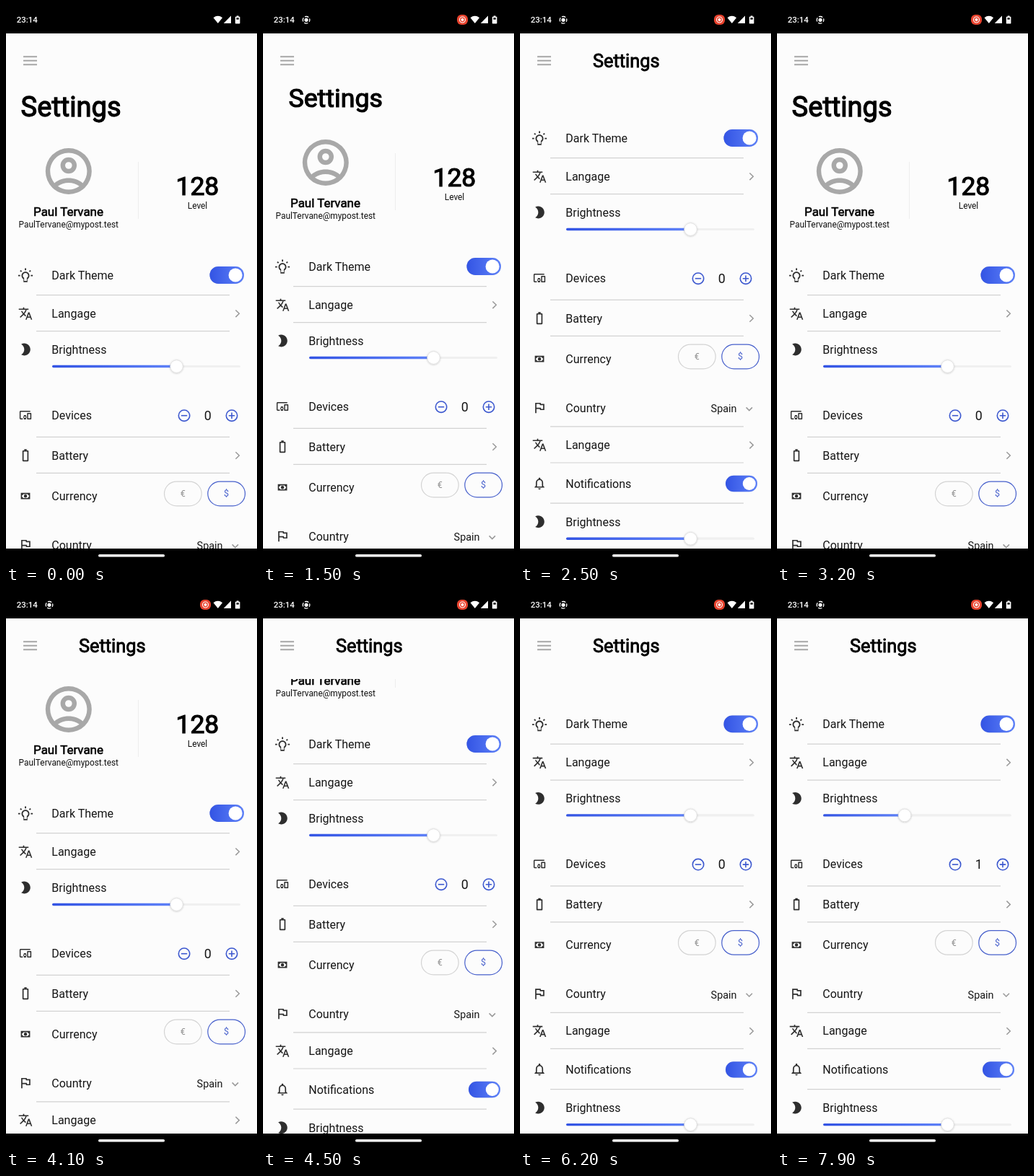
Animation, 348 px wide and 772 px high, one loop 8 s. Source, as an HTML page:

```html
<!DOCTYPE html>
<html lang="en">
<head>
<meta charset="utf-8">
<title>Settings</title>
<style>
  html, body { margin: 0; width: 100%; height: 100%; overflow: hidden; background: #fcfcfc; }
  svg { display: block; width: 348px; height: 772px; font-family: Roboto, sans-serif; }
  .label { font-size: 16px; fill: #161616; }
  .small { font-size: 11.85px; fill: #111; }
  .heavy { fill: #000; stroke: #000; stroke-width: .034em; }
  .mid { text-anchor: middle; }
  .rule { stroke: #d2d2d2; stroke-width: 1.2; }
  .icon { fill: #2e2e2e; fill-rule: evenodd; }
  .line { fill: none; stroke: #999; stroke-width: 1.5; }
  .blue { fill: none; stroke: #3c58cf; stroke-width: 1.6; }
</style>
</head>
<body>
<svg viewBox="0 0 348 772">
  <defs>
    <linearGradient id="accent"><stop stop-color="#3354e4"/><stop offset="1" stop-color="#5f82f8"/></linearGradient>
    <filter id="shadow" x="-30%" y="-30%" width="160%" height="160%">
      <feDropShadow dx="0" dy=".5" stdDeviation=".8" flood-opacity=".25"/>
    </filter>
  </defs>
  <rect width="348" height="772" fill="#fcfcfc"/>
  <g id="page"></g>
  <rect id="header" y="38" width="348" fill="#fcfcfc"/>
  <path d="M24 70.2h19M24 75.7h19M24 81.2h19" stroke="#a6a6a6" stroke-width="2"/>
  <text id="title" class="heavy" font-size="25.4">Settings</text>

  <rect width="348" height="38"/>
  <text x="14.7" y="23.2" font-size="11.4" font-weight="500" fill="#fff">23:14</text>
  <g id="cast" fill="none" stroke="#fff" stroke-width="1.3">
    <circle cx="60" cy="19.3" r="4.8" stroke-dasharray="5.5 2.04" stroke-dashoffset="2.7"/>
    <circle cx="60" cy="19.3" r="2.6" fill="#fff" stroke="none"/>
  </g>
  <g id="badge">
    <rect x="269" y="12" width="15" height="14" rx="6" fill="#e8432e"/>
    <circle cx="276.5" cy="19" r="4" fill="none" stroke="#fff" stroke-width="1.1"/>
    <circle cx="276.5" cy="19" r="2" fill="#fff"/>
  </g>
  <g fill="#fff">
    <path d="M287.5 16.2Q293.8 11.4 300.1 16.2L293.8 24z"/>
    <path d="M312 13.6V24H301.8z"/>
    <path d="M319.7 13.4h2.8v1.3h1.1q.8 0 .8 .8v8.2q0 .8-.8 .8h-5q-.8 0-.8-.8v-8.2q0-.8.8-.8h1.1z"/>
    <path d="M319.4 16.3h3.4v2.4h-3.4z" fill="#000"/>
  </g>
  <rect y="752" width="348" height="20"/>
  <rect x="128" y="760" width="92" height="3.6" rx="1.8" fill="#fff"/>
</svg>
<script>
const LOOP = 8000, STEP = 100;
const $ = id => document.getElementById(id);

const icons = {
  bulb: "M3.55 18.54l1.41 1.41 1.8-1.79-1.41-1.41zM11 22.45h2V19.5h-2zM4 10.5H1v2h3zM15 6.31V1.5H9v4.81C7.21 7.35 6 9.28 6 11.5c0 3.31 2.69 6 6 6s6-2.69 6-6c0-2.22-1.21-4.15-3-5.19zM12 15.5c-2.21 0-4-1.79-4-4 0-1.48.81-2.77 2-3.46V3.5h4v4.54c1.19.69 2 1.98 2 3.46 0 2.21-1.79 4-4 4zM20 10.5v2h3v-2zM17.24 18.16l1.79 1.8 1.41-1.41-1.8-1.79z",
  translate: "M12.87 15.07l-2.54-2.51.03-.03c1.74-1.94 2.98-4.17 3.71-6.53H17V4h-7V2H8v2H1v1.99h11.17C11.5 7.92 10.44 9.75 9 11.35 8.07 10.32 7.3 9.19 6.69 8h-2c.73 1.63 1.73 3.17 2.98 4.56l-5.09 5.02L4 19l5-5 3.11 3.11zM18.5 10h-2L12 22h2l1.12-3h4.75L21 22h2zm-2.62 7l1.62-4.33L19.12 17z",
  moon: "M10 2c-1.82 0-3.53.5-5 1.35C7.99 5.08 10 8.3 10 12s-2.01 6.92-5 8.65C6.47 21.5 8.18 22 10 22c5.52 0 10-4.48 10-10S15.52 2 10 2z",
  devices: "M3 6h18V4H3c-1.1 0-2 .9-2 2v12c0 1.1.9 2 2 2h4v-2H3zM13 12H9v1.78c-1.33 1.2-1.33 3.24 0 4.44V20h4v-1.78c1.33-1.2 1.33-3.24 0-4.44zM11 17.5a1.5 1.5 0 1 1 0-3 1.5 1.5 0 0 1 0 3zM22 8h-6c-.5 0-1 .5-1 1v10c0 .5.5 1 1 1h6c.5 0 1-.5 1-1V9c0-.5-.5-1-1-1zm-1 10h-4v-8h4z",
  battery: "M15.67 4H14V2h-4v2H8.33C7.6 4 7 4.6 7 5.33v15.33C7 21.4 7.6 22 8.33 22h7.33c.74 0 1.34-.6 1.34-1.33V5.33C17 4.6 16.4 4 15.67 4zM15 20H9V6h6z",
  money: "M4 6.5h16v11H4zM8 8.5a2 2 0 0 1-2 2v3a2 2 0 0 1 2 2h8a2 2 0 0 1 2-2v-3a2 2 0 0 1-2-2zM12 9.2a2.8 2.8 0 1 1 0 5.6 2.8 2.8 0 0 1 0-5.6z",
  flag: "M12.36 6l.4 2H18v6h-3.36l-.4-2H7V6zM14 4H5v17h2v-7h5.6l.4 2h7V6h-5.6z",
  bell: "M12 22c1.1 0 2-.9 2-2h-4c0 1.1.89 2 2 2zM18 16v-5c0-3.07-1.64-5.64-4.5-6.32V4c0-.83-.67-1.5-1.5-1.5s-1.5.67-1.5 1.5v.68C7.63 5.36 6 7.92 6 11v5l-2 2v1h16v-1zM16 17H8v-6c0-2.48 1.51-4.5 4-4.5s4 2.02 4 4.5z",
  person: "M12 2a10 10 0 1 0 0 20 10 10 0 0 0 0-20zM7.35 18.5C8.66 17.56 10.26 17 12 17s3.34.56 4.65 1.5C15.34 19.44 13.74 20 12 20s-3.34-.56-4.65-1.5zM18.14 17.12C16.45 15.8 14.32 15 12 15s-4.45.8-6.14 2.12C4.7 15.73 4 13.95 4 12c0-4.42 3.58-8 8-8s8 3.58 8 8c0 1.95-.7 3.73-1.86 5.12zM12 6a3.5 3.5 0 1 0 0 7 3.5 3.5 0 0 0 0-7zM12 11a1.5 1.5 0 1 1 0-3 1.5 1.5 0 0 1 0 3z"
};

const icon = (name, x, y, sx, sy = sx, attrs = "") =>
  `<path class="icon" ${attrs} transform="translate(${x} ${y}) scale(${sx} ${sy}) translate(-12 -12)" d="${icons[name]}"/>`;
const row = (name, label, y, size = .846, flip = 1) =>
  icon(name, 27, y - .5, size, size * flip) + `<text class="label" x="63.3" y="${y + 5.4}">${label}</text>`;
const rule = y => `<path class="rule" d="M42 ${y}H310"/>`;
const next = y => `<path class="line" d="M318.4 ${y - 4.8}l4.9 4.8l-4.9 4.8"/>`;
const toggle = (id, x, y, w, h) => `
  <rect x="${x}" y="${y - h / 2}" width="${w}" height="${h}" rx="${h / 2}" fill="#dcdcdc"/>
  <rect id="${id}Track" x="${x}" y="${y - h / 2}" width="${w}" height="${h}" rx="${h / 2}" fill="url(#accent)"/>
  <circle id="${id}Knob" cx="${x + w - h / 2}" cy="${y}" r="${h * .4}" fill="#fff"/>`;
const slider = (id, y) => `
  <rect x="64" y="${y - 1.6}" width="261" height="3.2" rx="1.6" fill="#f0f0f0"/>
  <rect id="${id}Fill" x="64" y="${y - 1.7}" width="173" height="3.4" rx="1.7" fill="url(#accent)"/>
  <circle id="${id}Thumb" cx="236.5" cy="${y}" r="8.8" fill="#fff" stroke="#ddd" stroke-width=".8" filter="url(#shadow)"/>`;
const stepButton = (x, y, sign) =>
  `<g class="blue"><circle cx="${x}" cy="${y}" r="7.7"/><path d="M${x - 4.2} ${y}h8.4${sign}"/></g>`;
const pill = (x, text, edge, ink) => `
  <rect x="${x}" y="659.2" width="51.7" height="33.6" rx="16.8" fill="none" stroke="${edge}" stroke-width="1.2"/>
  <text class="mid" x="${x + 25.8}" y="680.3" font-size="12.5" fill="${ink}">${text}</text>`;

$("page").innerHTML = [
  icon("person", 86.8, 229, 3.2, 3.2, 'style="fill:#a8a8a8"'),
  '<text class="heavy mid" x="86.5" y="290.6" font-size="16.93">Paul Tervane</text>',
  '<text class="small mid" x="86.8" y="307.2">PaulTervane@mypost.test</text>',
  '<path d="M183.5 216V295" stroke="#ededed"/>',
  '<text class="heavy mid" x="265.4" y="262.4" font-size="35.5">128</text>',
  '<text class="small mid" x="265.5" y="281.2">Level</text>',
  row("bulb", "Dark Theme", 373.7, .92, -1), toggle("theme", 282.4, 373, 47.6, 23.8), rule(400.7),
  row("translate", "Langage", 426.7), next(426.3), rule(450.7),
  row("moon", "Brightness", 476.5), slider("light", 499.5),
  row("devices", "Devices", 567.5, .74), stepButton(247, 567.7, ""), stepButton(313, 567.7, "m-4.2 -4.2v8.4"),
  '<text id="count" class="mid" x="279.7" y="574" font-size="17.8" fill="#161616">0</text>', rule(597.4),
  row("battery", "Battery", 623.2), next(623), rule(647.4),
  row("money", "Currency", 679.7, .8),
  pill(219.5, "€", "#d4d4d4", "#8c8c8c"), pill(279.8, "$", "#4760cc", "#4760cc"),
  row("flag", "Country", 747.2),
  '<text x="264.6" y="753.2" font-size="14.4" fill="#161616">Spain</text>',
  '<path class="line" d="M313.6 746.4l4.2 4.2l4.2-4.2"/>', rule(772.9),
  row("translate", "Langage", 798.7), next(798.6), rule(823),
  row("bell", "Notifications", 852.2), toggle("notice", 285, 852, 44, 22.4), rule(879.2),
  row("moon", "Brightness", 905.2), slider("glow", 928.2)
].join("");

const scrollSteps = [[1400, 0], [1500, 12], [1600, 50], [1700, 95], [1800, 128], [1900, 151.5],
  [2000, 167], [2200, 183], [2500, 190], [2600, 190], [2700, 178], [2800, 130], [2900, 78],
  [3000, 36], [3100, 10], [3200, 0], [3400, 0], [3500, 3], [3700, 17], [3900, 40], [4100, 65],
  [4300, 119], [4500, 161], [4700, 174.5], [4900, 181], [5100, 185], [5300, 187], [5600, 188.6]];
const thumbSteps = [[6900, 236.5], [7000, 230], [7100, 211], [7200, 194], [7300, 182], [7400, 177]];
const themeSteps = [[5800, 1], [6000, 0], [6200, 1]];

function valueAt(steps, t) {
  const i = steps.findIndex(step => step[0] > t);
  if (i === 0) return steps[0][1];
  if (i < 0) return steps[steps.length - 1][1];
  const [t0, a] = steps[i - 1], [t1, b] = steps[i];
  return a + (b - a) * (t - t0) / (t1 - t0);
}
const mix = (a, b, p) => a + (b - a) * p;

function draw(t) {
  const scroll = valueAt(scrollSteps, t);
  const fold = Math.min(scroll / 65, 1);
  $("page").setAttribute("transform", `translate(0 ${-scroll})`);
  $("header").setAttribute("height", Math.max(122, 187 - scroll) - 38);
  $("title").setAttribute("transform",
    `translate(${mix(20.6, 100.9, fold)} ${mix(153, 85, fold)}) scale(${mix(1.5, 1, fold)})`);

  const thumb = valueAt(thumbSteps, t);
  $("lightFill").setAttribute("width", thumb - 64);
  $("lightThumb").setAttribute("cx", thumb);

  const theme = valueAt(themeSteps, t);
  $("themeTrack").setAttribute("opacity", theme);
  $("themeKnob").setAttribute("cx", mix(294.3, 318.1, theme));

  $("count").textContent = t >= 7900 ? "1" : "0";
  $("badge").style.display = t >= 100 ? "" : "none";
  $("cast").style.display = t >= 400 ? "" : "none";
}

const start = performance.now();
function tick() {
  const t = (performance.now() - start) % LOOP;
  draw(Math.floor(t / STEP) * STEP);
  requestAnimationFrame(tick);
}
tick();
</script>
</body>
</html>
```
